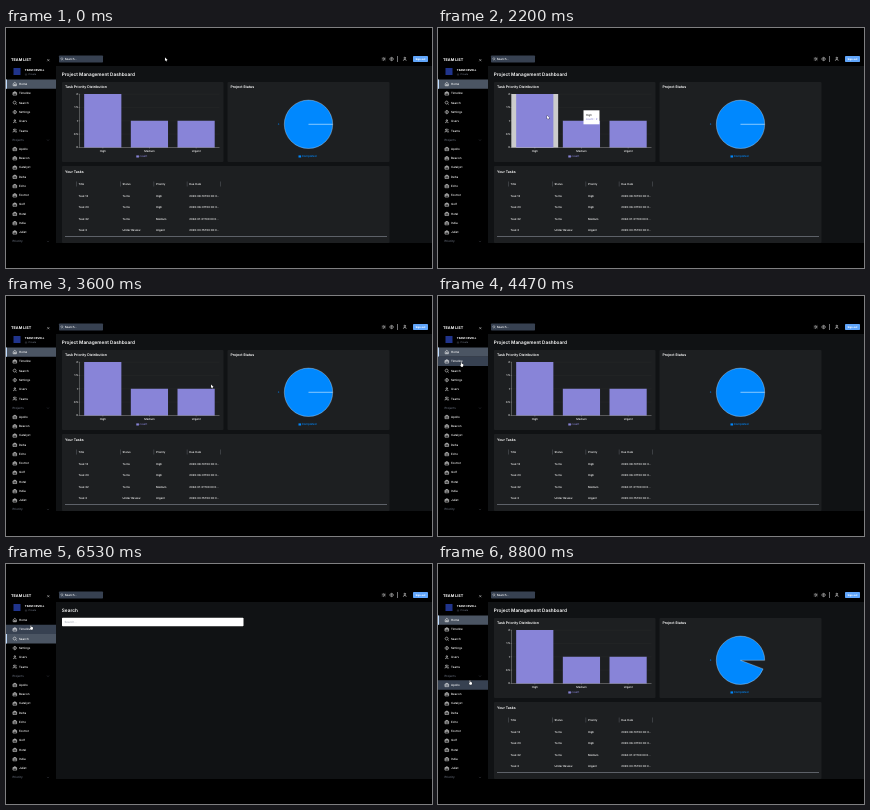
An HTML page with a canvas that plays this animation: 426x240 px, repeating every 8870 ms.

```html
<!DOCTYPE html>
<html lang="en">
<head>
<meta charset="utf-8">
<title>Project dashboard</title>
<style>
  html, body { margin: 0; width: 100%; height: 100%; overflow: hidden; background: #000; }
  canvas { display: block; width: 100vw; height: 100vh; }
</style>
</head>
<body>
<canvas id="stage"></canvas>
<script>
const W = 426, H = 240, LOOP = 8870, FPS = 15;
const canvas = document.getElementById('stage');
const g = canvas.getContext('2d');

const PAGE = '#101214', CARD = '#1d1f21', GRID = '#303030', ACTIVE = '#4b5563', HOVER = '#374151';
const VIOLET = '#8884d8', BLUE = '#0088fe', MUTED = '#6b7280';

// Page visible from each moment on
const TIMELINE_AT = 4600, SEARCH_AT = 5600, HOME_AT = 7345;

// Pointer tip: time, x, y
const POINTER = [
  [0, 159, 29.5], [530, 159, 29.5], [1200, 150, 60], [1800, 145, 78], [2130, 123, 83],
  [2200, 109, 87.5], [2500, 97, 88], [2750, 100, 88], [3300, 250, 90], [3460, 249, 90.5],
  [3600, 205, 88.5], [4300, 30, 68], [4500, 22, 66], [4900, 22, 66], [5330, 24, 75],
  [5700, 24, 75], [6300, 25, 69], [6530, 25, 61.5], [7000, 16, 56], [7350, 15, 55],
  [7600, 14, 44.5], [7900, 16, 60], [8800, 32, 116.5], [LOOP, 32, 116.5]
];
const ARROW = [[0, 0], [0, 3.5], [0.9, 2.7], [1.4, 3.9], [2, 3.6], [1.5, 2.5], [2.6, 2.5]];
const HAND = [[-0.4, 0], [0.3, 0], [0.4, 1.5], [2, 1.9], [2, 3.2], [1.5, 4.3], [-0.3, 4.3], [-1.2, 2.5], [-0.4, 2.7]];

const ICONS = {
  home: 'M3 10l9-8 9 8v11H3z M9 21v-8h6v8',
  brief: 'M2 7h20v14H2z M8 7V3h8v4 M2 13h20',
  search: 'M11 3a8 8 0 1 0 .01 0z M17 17l5 5',
  gear: 'M12 3a9 9 0 1 0 .01 0z M12 9a3 3 0 1 0 .01 0z',
  user: 'M12 3a4 4 0 1 0 .01 0z M5 21v-2a4 4 0 0 1 4-4h6a4 4 0 0 1 4 4v2',
  users: 'M9 3a4 4 0 1 0 .01 0z M2 21v-2a4 4 0 0 1 4-4h6a4 4 0 0 1 4 4v2 M16 3a4 4 0 0 1 0 8 M22 21v-2a4 4 0 0 0-3-4',
  sun: 'M12 7a5 5 0 1 0 .01 0z M12 1v3M12 20v3M1 12h3M20 12h3M4 4l2 2M18 18l2 2M4 20l2-2M18 6l2-2',
  down: 'M5 9l7 7 7-7',
  close: 'M5 5l14 14M19 5L5 19',
  lock: 'M4 11h16v10H4z M8 11V7a4 4 0 0 1 8 0v4'
};
for (const name in ICONS) ICONS[name] = new Path2D(ICONS[name]);

const NAV = [['Home', 'home'], ['Timeline', 'brief'], ['Search', 'search'],
             ['Settings', 'gear'], ['Users', 'user'], ['Teams', 'users']];

// Name, start date, end date, bar start, bar end
const PROJECTS = [
  ['Apollo', 'Sat, Decemb', 'Sat, Decemb', 155, 553],
  ['Beacon', 'Tue, January', 'Sat, October', 189, 469],
  ['Catalyst', 'Sat, March 4', 'Sat, Decem', 209, 640],
  ['Delta', 'Thu, January', 'Thu, Novem', 176, 442],
  ['Echo', 'Fri, April 14', 'Wed, Novem', 234, 556],
  ['Foxtrot', 'Fri, February', 'Thu, August', 217, 414],
  ['Golf', 'Tue, May 2', 'Sat, Decemb', 264, 566],
  ['Hotel', 'Tue, Februar', 'Sat, Decem', 222, 554],
  ['India', 'Wed, May 3', 'Thu, Novem', 296, 640],
  ['Juliet', 'Fri, June 30', 'Wed, Januar', 355, 640]
];
const TASKS = [
  ['Task 12', 'To Do', 'High', '2023-08-10T00:00:0…'],
  ['Task 23', 'To Do', 'High', '2023-06-01T00:00:0…'],
  ['Task 32', 'To Do', 'Medium', '2024-01-01T00:00:0…'],
  ['Task 3', 'Under Review', 'Urgent', '2023-03-15T00:00:0…']
];
const MONTHS = ['December', 'January', 'February', 'March', 'April', 'May', 'June', 'July', 'August'];
const BARS = [['High', 2], ['Medium', 1], ['Urgent', 1]];
const CHART = { left: 73.5, right: 213.5, base: 119.5, unit: 26.7, band: 140 / 3 };

function rect(x, y, w, h, color, radius = 0) {
  g.fillStyle = color;
  g.beginPath();
  g.roundRect(x, y, w, h, radius);
  g.fill();
}
function line(x1, y1, x2, y2, color, width = 0.25) {
  g.strokeStyle = color;
  g.lineWidth = width;
  g.beginPath();
  g.moveTo(x1, y1);
  g.lineTo(x2, y2);
  g.stroke();
}
// Set large and scaled down, so that tiny type keeps its true spacing
function text(str, x, y, size = 2.7, color = '#fff', weight = 500, align = 'left') {
  g.save();
  g.translate(x, y);
  g.scale(size / 40, size / 40);
  g.font = `${weight} 40px Inter, sans-serif`;
  g.textRendering = 'geometricPrecision';
  g.fillStyle = color;
  g.textAlign = align;
  g.textBaseline = 'middle';
  g.fillText(str, 0, 0);
  g.restore();
}
function icon(name, x, y, size = 4.4, color = '#fff') {
  g.save();
  g.translate(x - size / 2, y - size / 2);
  g.scale(size / 24, size / 24);
  g.strokeStyle = color;
  g.lineWidth = 2.8;
  g.stroke(ICONS[name]);
  g.restore();
}

// CSS "ease" curve
function ease(x) {
  if (x <= 0) return 0;
  if (x >= 1) return 1;
  let lo = 0, hi = 1, s;
  for (let i = 0; i < 20; i++) {
    s = (lo + hi) / 2;
    if (0.75 * s * (1 - s) + s ** 3 < x) lo = s; else hi = s;
  }
  return 0.3 * s * (1 - s) ** 2 + 3 * s * s * (1 - s) + s ** 3;
}
function pointerAt(t) {
  t = Math.max(0, t);
  const i = Math.max(1, POINTER.findIndex(p => p[0] >= t));
  const [t0, x0, y0] = POINTER[i - 1], [t1, x1, y1] = POINTER[i];
  const u = (t - t0) / (t1 - t0);
  return { x: x0 + (x1 - x0) * u, y: y0 + (y1 - y0) * u };
}
function bandAt({ x, y }) {
  const inside = x > CHART.left && x < CHART.right && y > 66 && y < CHART.base;
  return inside ? Math.floor((x - CHART.left) / CHART.band) : -1;
}

function navRow(label, iconName, y, active, mouse) {
  const over = mouse.x < 50 && Math.abs(mouse.y - y) < 4.65;
  if (active || over) rect(0, y - 4.65, 50, 9.3, active ? ACTIVE : HOVER);
  if (active) rect(0, y - 4.65, 1, 9.3, '#bfdbfe');
  icon(iconName, 8.8, y);
  text(label, 13, y, 2.9);
}
function drawSidebar(page, mouse) {
  text('TEAM LIST', 5, 32.2, 3.8, '#fff', 700);
  icon('close', 42.3, 32.2, 3.6);
  rect(7.5, 40, 7, 7, '#20348c');
  text('TEAM ORVELL', 18.8, 42.4, 2.75, '#fff', 700);
  icon('lock', 20, 46.4, 2.2, MUTED);
  text('Private', 22.5, 46.6, 2.3, MUTED);
  NAV.forEach(([label, name], i) => navRow(label, name, 56.1 + i * 9.33, label === page, mouse));
  text('Projects', 6.5, 112, 2.9, MUTED);
  icon('down', 42, 112, 3, MUTED);
  PROJECTS.forEach(([label], i) => navRow(label, 'brief', 121 + i * 9.27, false, mouse));
  text('Priority', 6.5, 213.3, 2.9, MUTED);
  icon('down', 42, 213.3, 3, MUTED);
}
function drawNavbar() {
  rect(53, 27.5, 44, 7, HOVER, 0.7);
  icon('search', 56, 31, 3);
  text('Search...', 58.7, 31, 2.9);
  icon('sun', 377.8, 31);
  icon('gear', 385.6, 31);
  line(391.5, 28, 391.5, 34, '#e5e7eb', 0.5);
  icon('user', 398.8, 31, 4.6);
  rect(407, 28, 15, 6, '#60a5fa', 0.7);
  text('Sign out', 414.5, 31, 2.5, '#fff', 700, 'center');
}

function drawBarChart(t, grow) {
  const { left, right, base, unit, band } = CHART;
  for (let v = 0; v <= 2; v += 0.5) {
    const y = base - v * unit;
    line(left, y, right, y, GRID);
    line(left - 1, y, left, y, '#fff');
    text(v, left - 1.6, y, 2.7, '#fff', 500, 'right');
  }
  const active = bandAt(pointerAt(t - 30));
  if (active >= 0) rect(left + active * band, base - 2 * unit, band, 2 * unit, '#ccc');
  BARS.forEach(([label, value], i) => {
    const x = left + i * band, h = value * unit * grow;
    rect(x + band * 0.1, base - h, 37.2, h, VIOLET);
    text(label, x + band / 2, 122.8, 2.7, '#fff', 500, 'center');
    line(x + band / 2, base, x + band / 2, base + 1, '#fff');
  });
  line(left, 66, left, base, '#fff');
  line(left, base, right, base, '#fff');
  rect(130.3, 127.4, 2.6, 2.1, VIOLET);
  text('count', 133.6, 128.5, 2.8, VIOLET);
  if (active >= 0) drawTooltip(t, active);
}
function drawTooltip(t, active) {
  // Trails behind the pointer
  let x = 0, y = 0;
  const samples = 16;
  for (let k = 0; k < samples; k++) {
    const p = pointerAt(t - 60 - k * 25);
    const i = Math.max(0, Math.min(2, Math.floor((p.x - CHART.left) / CHART.band)));
    x += (CHART.left + (i + 0.5) * CHART.band + 2) / samples;
    y += (p.y + 2) / samples;
  }
  rect(x, y, 16, 14, '#fff');
  text(BARS[active][0], x + 2.2, y + 4.6, 2.8, '#333');
  text('count : ' + BARS[active][1], x + 2.2, y + 9.3, 2.8, VIOLET);
}
function drawPie(sweep) {
  const x = 302.5, y = 96.3, r = 24.2;
  if (sweep > 0) {
    g.beginPath();
    g.moveTo(x, y);
    g.arc(x, y, r, 0, -sweep * Math.PI * 2, true);
    g.closePath();
    g.fillStyle = BLUE;
    g.fill();
    g.strokeStyle = '#fff';
    g.lineWidth = 0.3;
    g.stroke();
  }
  text('4', 273.4, y, 2.6, BLUE, 400, 'right');
  rect(292.5, 127.4, 2.6, 2.1, BLUE);
  text('Completed', 295.8, 128.5, 2.8, BLUE);
}
function drawHome(t) {
  const age = t >= HOME_AT ? t - HOME_AT : Infinity;
  text('Project Management Dashboard', 55.8, 46.3, 4.7, '#fff', 600);
  rect(56, 54, 161.5, 80, CARD, 1);
  rect(221.5, 54, 162, 80, CARD, 1);
  rect(56, 138, 327.5, 77, CARD, 1);
  text('Task Priority Distribution', 59, 59.2, 3.5, '#fff', 600);
  text('Project Status', 224.5, 59.2, 3.5, '#fff', 600);
  text('Your Tasks', 59, 143.5, 3.5, '#fff', 600);
  drawPie(ease((age - 400) / 1500));
  drawBarChart(t, ease(age / 400));

  const columns = [72.5, 116.5, 150, 183.3];
  ['Title', 'Status', 'Priority', 'Due Date'].forEach((s, i) => text(s, columns[i], 156));
  for (const x of [70.5, 114.5, 147.8, 181.2, 214.5]) line(x, 153.5, x, 158.5, '#9ca3af');
  TASKS.forEach((row, r) => {
    row.forEach((s, i) => text(s, columns[i], 167.8 + r * 11.5));
  });
  line(59, 208.5, 381, 208.5, '#9ca3af', 0.5);
}

function drawTimeline() {
  text('Projects Timeline', 55.8, 46.3, 4.7, '#fff', 600);
  rect(376, 45, 42.5, 6.5, CARD, 0.7);
  text('Month', 378.5, 48.2);
  icon('down', 416, 48.2, 2.2);
  rect(56, 56.5, 363, 126, CARD, 1);
  ['Name', 'From', 'To'].forEach((s, i) => text(s, 57 + i * 22, 61.8));
  MONTHS.forEach((s, i) => text(s, 138.5 + i * 33.3, 64.4, 2.7, '#fff', 500, 'center'));
  g.save();
  g.beginPath();
  g.rect(56, 56, 363, 130);
  g.clip();
  PROJECTS.forEach(([name, from, to, start, end], i) => {
    const y = 73 + i * 11.08;
    if (i % 2) rect(56, y - 5.54, 363, 11.08, '#45474c');
    rect(start, y - 3.6, end - start, 7.2, PAGE, 0.6);
    text(name, (start + end) / 2, y + 0.2, 2.7, '#fff', 500, 'center');
    text(name, 59, y);
    text(from, 79, y);
    text(to, 101, y);
  });
  g.restore();
  rect(122.3, 179.7, 296.7, 2.5, '#fff');
  rect(225, 180.2, 194, 1.5, '#e5e5e5');
}

function drawSearch() {
  text('Search', 55.8, 46.3, 4.7, '#fff', 600);
  rect(56, 53.7, 181.5, 8.6, '#fff', 0.7);
  text('Search...', 58.5, 58, 2.9, '#9ca3af', 400);
}

function drawPointer({ x, y }) {
  const overLink = x < 50 && y > 51.4;
  g.beginPath();
  for (const [dx, dy] of overLink ? HAND : ARROW) g.lineTo(x + dx, y + dy);
  g.closePath();
  g.lineWidth = 0.5;
  g.strokeStyle = '#222';
  g.stroke();
  g.fillStyle = '#fff';
  g.fill();
}

function draw(now) {
  const t = Math.floor((now % LOOP) * FPS / 1000 + 0.1) * 1000 / FPS;
  const width = Math.round(innerWidth * devicePixelRatio), height = Math.round(innerHeight * devicePixelRatio);
  if (canvas.width !== width || canvas.height !== height) {
    canvas.width = width;
    canvas.height = height;
  }
  g.setTransform(width / W, 0, 0, height / H, 0, 0);
  rect(0, 0, W, H, '#000');
  rect(50, 38, W - 50, 177, PAGE);

  const mouse = pointerAt(t);
  const page = t < TIMELINE_AT || t >= HOME_AT ? 'Home' : t < SEARCH_AT ? 'Timeline' : 'Search';
  drawSidebar(page, mouse);
  drawNavbar();
  if (page === 'Home') drawHome(t);
  else if (page === 'Timeline') drawTimeline();
  else drawSearch();
  drawPointer(mouse);
  requestAnimationFrame(() => draw(performance.now()));
}
draw(performance.now());
</script>
</body>
</html>
```
